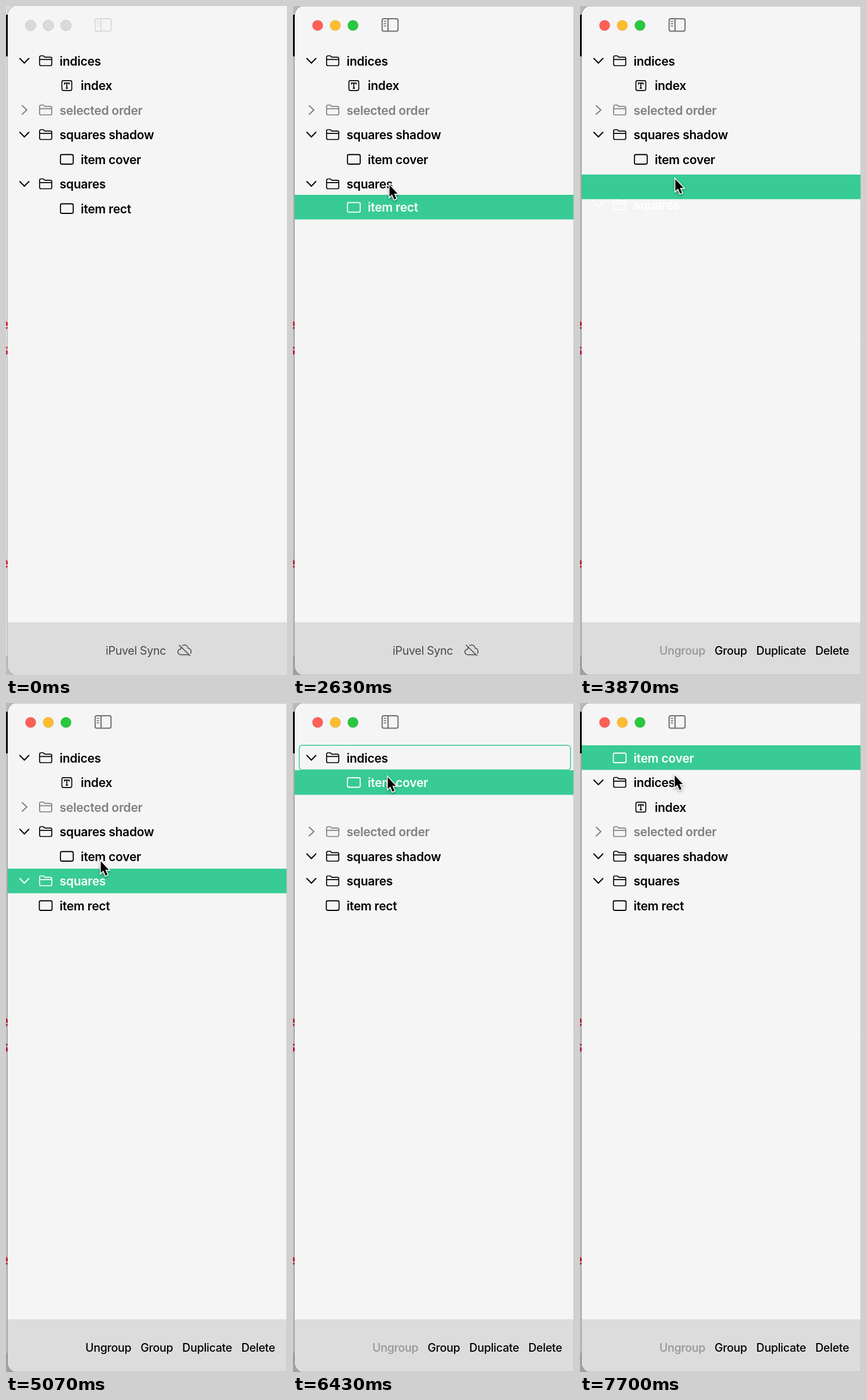
Animation of 485x1155 px, one loop 8000 ms. Source, as an HTML page with a canvas:

```html
<!DOCTYPE html>
<html lang="en">
<head>
<meta charset="utf-8">
<title>Layer list</title>
<style>
html, body { margin: 0; width: 100%; height: 100%; overflow: hidden; background: #f5f5f5; }
canvas { display: block; }
</style>
</head>
<body>
<canvas id="stage" width="485" height="1155"></canvas>
<script>
const ctx = document.getElementById('stage').getContext('2d');
const W = 485, H = 1155, LOOP = 8000, ROW = 42.5, INDENT = 36.5;
const GREEN = '#38cb95', PANEL = '#f5f5f5', BAR = '#dcdcdc', GREY = '#484848';

const smooth = p => p * p * (3 - 2 * p);
// Eased progress 0..1 of a move that begins at `start`
const ease = (t, start, length = 300) => smooth(Math.min(1, Math.max(0, (t - start) / length)));
const slotY = slot => 94.5 + ROW * slot;

function text(s, x, y, size, weight, color, alpha = 1) {
  ctx.globalAlpha = alpha;
  ctx.font = `${weight} ${size}px Inter, "Liberation Sans", sans-serif`;
  ctx.letterSpacing = '-0.25px';
  ctx.fillStyle = color;
  ctx.fillText(s, x, y);
  ctx.globalAlpha = 1;
}

function stroke(path, width, color, x = 0, y = 0) {
  ctx.save();
  ctx.translate(x, y);
  ctx.lineWidth = width;
  ctx.strokeStyle = color;
  ctx.stroke(new Path2D(path));
  ctx.restore();
}

function box(x, y, w, h, r, width, color) {
  ctx.beginPath();
  ctx.roundRect(x, y, w, h, r);
  ctx.lineWidth = width;
  ctx.strokeStyle = color;
  ctx.stroke();
}

// Icons and arrows are drawn around their centre
const icons = {
  folder(x, y, c) {
    stroke('M-10.5-6q0-2.5 2.5-2.5h4l2.5 2.3h9.5q2.5 0 2.5 2.5v9.7q0 2.5-2.5 2.5h-16q-2.5 0-2.5-2.5zM-10.5-2.2h21', 1.7, c, x, y);
  },
  rect(x, y, c) { box(x - 11, y - 8, 22, 16.5, 2.5, 1.8, c); },
  type(x, y, c) {
    box(x - 8.5, y - 8.2, 17, 17, 2.5, 1.7, c);
    stroke('M-4-1.5v-2.3h8v2.3M0-4v8.8M-2 4.8h4', 1.7, c, x, y);
  }
};
const arrows = { down: 'M-8.3-4.5l8.3 8.5 8.3-8.5', right: 'M-4.3-8l8.6 8-8.6 8' };

function drawRow({ label, icon, arrow, depth = 0, slot }, c) {
  const y = slotY(slot), x = 92.5 + INDENT * depth;
  if (arrow) stroke(arrows[arrow], 2, c, 31.7, y);
  icons[icon](x - 24, y, c);
  text(label, x, y + 8, 21, 600, c);
}

function backdrop(active) {
  ctx.fillStyle = '#dadada';
  ctx.fillRect(0, 0, W, H);
  ctx.fillStyle = '#000';
  ctx.fillRect(0, 15, 8, 72);
  ctx.fillStyle = '#bdbdbd';
  ctx.fillRect(0, 1122, 30, 33);
  ctx.textAlign = 'right';
  for (const [s, y] of [['e', 559], ['s', 603], ['e', 971]]) text(s, 4.5, y, 29, 700, '#e02a3c');
  ctx.textAlign = 'left';
  ctx.fillStyle = `rgba(0,0,0,${0.15 * active})`;
  ctx.fillRect(0, 0, 30, H);
}

function titleBar(active) {
  ['#ff5f57', '#febc2e', '#28c840'].forEach((color, i) => {
    ctx.beginPath();
    ctx.arc(42.5 + 30.5 * i, 33.5, 9.1, 0, 7);
    ctx.fillStyle = active ? color : '#dadada';
    ctx.fill();
    ctx.lineWidth = 1;
    ctx.strokeStyle = active ? 'rgba(0,0,0,.1)' : '#c8c8c8';
    ctx.stroke();
  });
  const c = active ? '#6e6e6e' : '#dadada';
  box(153.8, 22, 27.5, 21.5, 3, 2, c);
  stroke('M164 22v21', 2, c);
  stroke('M156.5 26.5h4.5m-4.5 4h4.5m-4.5 4h4.5', 1.5, c);
}

function footer(t) {
  const shown = ease(t, 2640);
  const grouped = ease(t, 4030) - ease(t, 5625);
  ctx.fillStyle = BAR;
  ctx.fillRect(0, 1064, W, 91);

  text('iPuvel Sync', 172, 1120, 19.5, 400, GREY, 1 - shown);
  ctx.globalAlpha = 1 - shown;
  stroke('M302 1120c-7 0-7-9.5-.5-9.5c.5-9.5 12-9.5 13-1.5c6.5 0 6.5 11 0 11z', 1.6, GREY);
  stroke('M299.5 1102l19.5 19', 3, BAR);
  stroke('M298.5 1103l19.5 19', 1.6, GREY);
  ctx.globalAlpha = 1;

  let x = 464.5;
  for (const s of ['Delete', 'Duplicate', 'Group', 'Ungroup']) {
    ctx.textAlign = 'right';
    text(s, x, 1120, 19.5, 450, '#000', shown * (s === 'Ungroup' ? 0.32 + 0.68 * grouped : 1));
    x -= ctx.measureText(s).width + 16;
  }
  ctx.textAlign = 'left';
}

function list(t) {
  const makeRoom = ease(t, 5625, 330), toTop = ease(t, 7130);
  const lift = ease(t, 3470, 400), settle = ease(t, 4030, 270);
  const rows = {
    indices: { label: 'indices', icon: 'folder', arrow: 'down', slot: toTop },
    index: { label: 'index', icon: 'type', depth: 1, slot: 1 + ease(t, 6500, 270) },
    order: { label: 'selected order', icon: 'folder', arrow: 'right', slot: 2 + makeRoom },
    shadow: { label: 'squares shadow', icon: 'folder', arrow: 'down', slot: 3 + makeRoom },
    cover: {
      label: 'item cover', icon: 'rect', depth: 1 - ease(t, 7300),
      slot: 4 - 3 * ease(t, 5400, 800) - ease(t, 6980)
    },
    squares: {
      label: 'squares', icon: 'folder', arrow: 'down',
      slot: 5 + ease(t, 2700) - 0.15 * lift - 0.85 * settle
    },
    rect: {
      label: 'item rect', icon: 'rect', depth: 1 - ease(t, 3000),
      slot: 6 - ease(t, 2597, 250) + settle
    }
  };
  const held = t < 2630 ? null : t < 3470 ? rows.rect : t < 5400 ? rows.squares : rows.cover;

  ctx.globalAlpha = makeRoom - ease(t, 7050);
  box(10.7, 73, 468.3, ROW, 5, 1.5, GREEN);
  ctx.globalAlpha = 1;

  for (const row of Object.values(rows)) {
    if (row !== held) drawRow(row, row === rows.order ? '#7f7f7f' : '#000');
  }
  if (!held) return;
  // The squares label lags behind its highlight
  const band = held === rows.squares ? 6 - 0.87 * lift - 0.13 * settle : held.slot;
  ctx.fillStyle = GREEN;
  ctx.fillRect(0, Math.round(slotY(band) - 21.5), W, ROW);
  drawRow(held, '#fff');
}

function panel(active, t) {
  ctx.save();
  ctx.beginPath();
  ctx.roundRect(3, -1, 520, H + 2, [18, 0, 0, 18]);
  ctx.lineWidth = 1.5;
  ctx.strokeStyle = 'rgba(0,0,0,.22)';
  ctx.stroke();
  ctx.clip();
  ctx.fillStyle = PANEL;
  ctx.fillRect(0, 0, W, H);
  titleBar(active);
  footer(t);
  list(t);
  ctx.restore();
  ctx.globalAlpha = active;
  stroke('M14 .5H484.5V1154.5H14', 1, '#c4c4c4');
  ctx.globalAlpha = 1;
}

// Time, x, y of each place the pointer heads for
const stops = [
  [1370, 490, 400], [1700, 71, 42], [2100, 71, 42], [2470, 165, 342], [2597, 165, 342],
  [2630, 165, 306], [2800, 164, 294], [3000, 164, 294], [3430, 165, 334], [3870, 163, 296],
  [4530, 163, 296], [4800, 143, 231], [5070, 162, 270], [5400, 165, 257], [6200, 162, 125],
  [6970, 162, 125], [7200, 162, 83], [7700, 162, 122], [LOOP, 162, 122]
];

function cursor(t) {
  const i = stops.findIndex(s => s[0] > t);
  if (i < 1) return;
  const [t0, x0, y0] = stops[i - 1], [t1, x1, y1] = stops[i];
  const p = ease(t, t0, t1 - t0);
  const shape = new Path2D('M0 0v20.5l4.5-4.2 3.8 8.7 3.4-1.5L8 15h6z');
  ctx.save();
  ctx.translate(x0 + (x1 - x0) * p + 1.5, y0 + (y1 - y0) * p + 3);
  ctx.shadowColor = 'rgba(0,0,0,.35)';
  ctx.shadowBlur = 4;
  ctx.shadowOffsetY = 2;
  ctx.lineWidth = 3;
  ctx.strokeStyle = '#fff';
  ctx.stroke(shape);
  ctx.shadowColor = 'transparent';
  ctx.fillStyle = '#000';
  ctx.fill(shape);
  ctx.restore();
}

function frame(now) {
  const t = now % LOOP, active = ease(t, 630, 600);
  backdrop(active);
  panel(active, t);
  cursor(t);
  requestAnimationFrame(frame);
}
requestAnimationFrame(frame);
</script>
</body>
</html>
```
